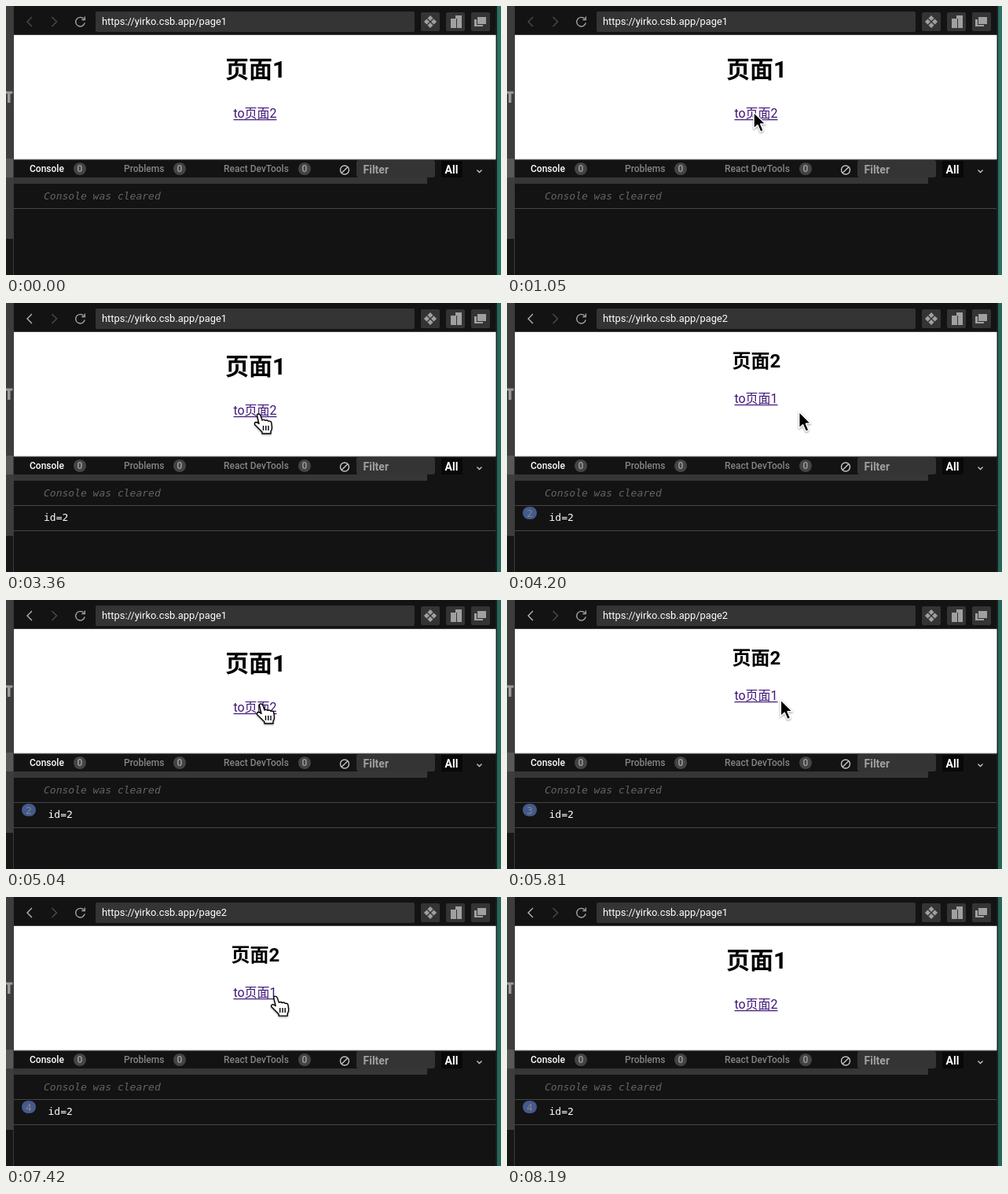
These frames come from a looping animation (630x342 px, 8820 ms). An HTML page:

```html
<!DOCTYPE html>
<html lang="zh">
<head>
<meta charset="utf-8">
<title>Page navigation</title>
<style>
  html, body { margin: 0; width: 100%; height: 100%; overflow: hidden; background: #131313; }
  svg { display: block; }
  text { font: 500 12px Roboto, sans-serif; fill: #858585; white-space: pre; }
  .url { font-size: 12.9px; font-weight: 400; fill: #fff; }
  .bold { font-size: 14px; font-weight: 700; }
  .mono { font: 13px "DejaVu Sans Mono", monospace; }
  .mid { text-anchor: middle; }
  .page { font: 16px Roboto, "Noto Sans CJK SC", "Noto Sans CJK", sans-serif; fill: #000; }
  .link { fill: #3f1678; }
  .line { fill: none; stroke-width: 1.4; }
  .white { fill: #fff; }
  .soft { fill: #a0a0a0; }
</style>
</head>
<body>
<svg width="630" height="342">
  <!-- editor edges -->
  <rect width="9" height="296" fill="#3d3d3d"/>
  <rect y="194" width="9" height="24" fill="#585858"/>
  <rect y="296" width="9" height="46" fill="#171717"/>
  <path d="M0 108.5H8.5V111.5H5.5V123H2V111.5H0Z" fill="#9a9a9a"/>
  <rect x="9" width="1" height="342" fill="#3a3a3a"/>
  <rect id="edge" x="625" width="5" height="342"/>
  <rect x="623" width="2" height="342" fill="#16211f"/>

  <!-- toolbar -->
  <path id="back" class="line" d="M33 14l-6 6 6 6"/>
  <path class="line" d="M58.5 14l6 6-6 6" stroke="#4c4c4c"/>
  <path class="line" d="M99 16.5A5.8 5.8 0 1 0 100.2 21.3M100.3 13.6v4H96.3" stroke="#a5a5a5"/>
  <rect x="114" y="7" width="406" height="26" rx="2" fill="#343434"/>
  <text id="url" class="url" x="122" y="24"></text>
  <g id="buttons" fill="#343434"></g>
  <g id="diamonds" class="soft" transform="translate(540 20) rotate(45)"></g>
  <g class="soft">
    <path d="M572 12h8v16h-6v-12h-2zM566 16h7v12h-7z"/>
    <path d="M600 14h11v9h-11zM596 17h3v7h8v2h-11z"/>
  </g>

  <!-- page -->
  <rect class="white" x="10" y="36.8" width="613.5" height="158"/>
  <text id="title" class="page mid" x="317.5"></text>
  <text id="link" class="page link mid" x="317"></text>
  <rect id="under" class="link" x="289.5" width="55" height="1.2"/>

  <!-- console -->
  <rect x="10" y="195" width="613" height="1" fill="#555"/>
  <rect x="10" y="218" width="526" height="8" fill="#363636"/>
  <g id="tabs"></g>
  <g class="line" stroke="#c4c4c4">
    <circle cx="431" cy="208.5" r="5.5"/>
    <path d="M427.2 212.3l7.6-7.6M599.5 208.5l3 3 3-3"/>
  </g>
  <rect x="446" y="196" width="100" height="22" rx="3" fill="#343434"/>
  <text class="bold" x="454.5" y="212.5" style="fill:#a0a0a0">Filter</text>
  <rect x="554" y="197" width="27" height="21" fill="#080808"/>
  <text class="bold white" x="558.5" y="213">All</text>
  <text class="mono" x="48" y="246" style="font-style:italic;fill:#656565">Console was cleared</text>
  <rect x="10" y="257" width="613" height="1" fill="#464646"/>
  <g id="log">
    <rect x="10" y="289" width="613" height="1" fill="#464646"/>
    <g id="badge">
      <rect x="20" y="259" width="18" height="16" rx="8" fill="#455a8c"/>
      <text id="count" class="mono mid" x="29" y="271.5"></text>
    </g>
    <text id="entry" class="mono white" y="277">id=2</text>
  </g>

  <!-- pointer -->
  <g id="cursor" stroke-linejoin="round" style="filter:drop-shadow(0 1px 1px #0006)">
    <path id="arrow" d="M0 1V22L4.9 17.4 8.6 26 12.4 24.4 8.7 16H15Z" stroke="#fff" stroke-width="1.5"/>
    <g id="hand" stroke="#000" stroke-width="1.4">
      <path class="white" d="M-2.5 2Q-2.5 0-.8 0 1.4 0 2 2L4 8Q6.5 6.5 8 8.5 10.5 7 12 9.3 15 8.5 15.7 11L16.5 17Q16.5 20 15 22V25H4V23Q-1 18-5.5 13.5-6 10.5-3.5 10.5-1.5 11 0 12.5Z"/>
      <path d="M5.5 15v6M8.8 15v6M12 15v6"/>
    </g>
  </g>
</svg>
<script>
const LOOP = 8820, STEP = 70, LEAD = 70;
const $ = id => document.getElementById(id);
const show = (id, on) => $(id).setAttribute('display', on ? 'inline' : 'none');
const set = (id, attrs) => {
  for (const k in attrs) $(id).setAttribute(k, attrs[k]);
};
const mix = (a, b, p) => a + (b - a) * p;
const mixPoint = (a, b, p) => ({ x: mix(a.x, b.x, p), y: mix(a.y, b.y, p) });
const progress = (t, from, to) => Math.min(1, Math.max(0, (t - from) / (to - from)));
const ease = p => p * p * (3 - 2 * p);

// Each visit leaves page 1 at a point on its link and returns by the link on page 2.
const visits = [
  { out: 2030, back: 3080, x: 314, y: 134 },
  { out: 3850, back: 4760, x: 322, y: 141 },
  { out: 5250, back: 6020, x: 325, y: 132 },
  { out: 6720, back: 7560, x: 336, y: 139 }
];
const enter = { x: 606, y: 262 }, leave = { x: 370, y: 308 }, home = { x: 330, y: 121 };
const SWING = 378, MOVE = 280;

$('buttons').innerHTML = [528, 560, 592].map(x =>
  `<rect x="${x}" y="8" width="24" height="24" rx="2"/>`).join('');
$('diamonds').innerHTML = [0, 1, 2, 3].map(i =>
  `<rect x="${i % 2 ? 0.7 : -5.7}" y="${i > 1 ? 0.7 : -5.7}" width="5" height="5"/>`).join('');
$('tabs').innerHTML = [['Console', 30, 94], ['Problems', 150, 221], ['React DevTools', 277, 380]]
  .map(([name, x, cx], i) =>
    `<text class="${i ? '' : 'white'}" x="${x}" y="211">${name}</text>
     <circle cx="${cx}" cy="207" r="8" fill="#444"/>
     <text class="mid soft" x="${cx}" y="211.2">0</text>`).join('');

function pointer(t) {
  if (t < 70 || t >= 8190) return null;
  const next = visits.findIndex(v => t < v.back);
  if (next < 0) return mixPoint(home, leave, ease(progress(t, 7560, 8190)));

  const visit = visits[next];
  if (t < visit.out - LEAD) {
    return next
      ? mixPoint(home, visit, ease(progress(t, visits[next - 1].back, visits[next - 1].back + MOVE)))
      : mixPoint(enter, visit, ease(progress(t, 70, 980)));
  }
  // quick swing to the right, slower return
  const p = progress(t, visit.out - LEAD, visit.back);
  const at = mixPoint(visit, home, p * p);
  at.x = mix(at.x, SWING, Math.sin(Math.PI * Math.sqrt(p)));
  return at;
}

function draw(t) {
  const count = visits.filter(v => v.out <= t).length;
  const second = count > visits.filter(v => v.back <= t).length;
  const page = second ? 2 : 1;

  $('url').textContent = 'https://yirko.csb.app/page' + page;
  $('title').textContent = '页面' + page;
  $('link').textContent = 'to页面' + (3 - page);
  $('title').style.cssText = `font-weight:700;font-size:${second ? 24 : 30}px`;
  set('title', { y: second ? 82 : 91 });
  set('link', { y: second ? 127 : 142 });
  set('under', { y: second ? 129 : 144 });
  set('back', { stroke: count ? '#b5b5b5' : '#4c4c4c' });
  set('edge', { fill: t < 1680 ? '#2b7062' : '#276558' });

  show('log', count > 0);
  show('badge', count > 1);
  $('count').textContent = count;
  set('entry', { x: count > 1 ? 53.5 : 48 });

  const at = pointer(t);
  show('cursor', at);
  if (!at) return;
  const waiting = t >= 1050 && t < 1540;
  const over = !waiting && Math.abs(at.x - 317) < 30 && Math.abs(at.y - (second ? 121 : 137)) < 11;
  set('cursor', { transform: `translate(${at.x} ${at.y})` });
  show('hand', over);
  show('arrow', !over);
}

const start = performance.now();
function frame() {
  const t = (performance.now() - start) % LOOP;
  draw(Math.floor(t / STEP) * STEP);
  requestAnimationFrame(frame);
}
frame();
</script>
</body>
</html>
```
